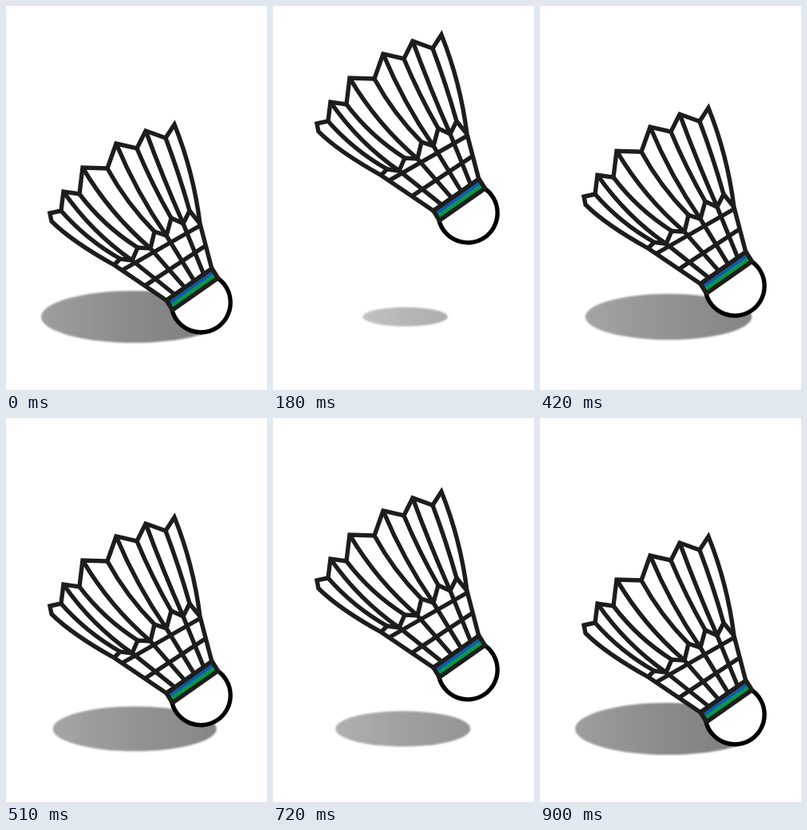
Write an HTML page that moves like this. It is 327 by 480 pixels and loops after 0.93 s.

```html
<!DOCTYPE html>
<html lang="en">
<head>
<meta charset="utf-8">
<title>Bouncing shuttlecock</title>
<style>
  html, body { margin: 0; width: 100%; height: 100%; overflow: hidden; background: #fff; }
  svg { display: block; width: 327px; height: 480px; }
  .ink { fill: none; stroke: #1d1d1b; stroke-width: 5.4; stroke-miterlimit: 8; }
  .paper { fill: #fff; }
</style>
</head>
<body>
<svg viewBox="0 0 327 480">
  <defs>
    <linearGradient id="shade">
      <stop offset="0" stop-color="#9e9e9e"/>
      <stop offset=".45" stop-color="#8c8c8c"/>
      <stop offset="1" stop-color="#7c7c7c"/>
    </linearGradient>
    <filter id="soft" x="-10%" y="-20%" width="120%" height="140%">
      <feGaussianBlur stdDeviation="0.9"/>
    </filter>
  </defs>
  <ellipse id="shadow" fill="url(#shade)" filter="url(#soft)"/>
  <g id="bird">
    <path class="ink paper" style="stroke:#000" d="M208 380A37.2 37.2 0 1 0 265 340Z"/>
    <path class="ink paper" d="M55 259L69 256L72 232L92 235L96 202L127 203L138 172L164 178L175 156L200 165L211 148Q235 208 243 272L258 329L201 368L136 324Q82 294 57 269Z"/>
    <path id="vanes" class="ink"/>
    <path class="ink" d="M136 323L143 316L158 318L165 302L181 303L186 282L201 287L207 265L222 272L230 256L243 272"/>
    <path class="ink" d="M146 330L244 274M175 349L251 299"/>
    <path class="ink" d="M158 318L212 361M181 303L224 352M201 287L236 344M222 272L248 336"/>
    <path fill="#0f5ba6" d="M201 368L258 328L262 334L205 374Z"/>
    <path fill="#0a9648" d="M204.500 374L261.500 334L265 340L208 380Z"/>
    <path class="ink" stroke-linejoin="round" d="M201 368L258 328L265.500 340L208.500 380Z"/>
  </g>
</svg>
<script>
  const $ = id => document.getElementById(id);
  const bird = $('bird'), shadow = $('shadow');

  // Feather folds: x, y at the rim, x, y at the collar, sideways bow
  const folds = [
    [69, 256, 143, 316, 8], [72, 232, 158, 318, 11], [92, 235, 165, 302, 9],
    [96, 202, 181, 303, 11], [127, 203, 186, 282, 7], [138, 172, 201, 287, 7],
    [164, 178, 207, 265, 3], [175, 156, 222, 272, 2], [200, 165, 230, 256, -2]
  ];
  $('vanes').setAttribute('d', folds.map(([x, y, u, v, bow]) => {
    const len = Math.hypot(u - x, v - y);
    const cx = (x + u) / 2 - bow * (v - y) / len;
    const cy = (y + v) / 2 + bow * (u - x) / len;
    return `M${x} ${y}Q${cx} ${cy} ${u} ${v}`;
  }).join(''));

  const STEP = 30, LOOP = 930;
  // Flight legs: start, end (in steps), peak height, ease strength, rising
  const legs = [
    [0, 7, 122, 0.5, true], [7, 14.75, 122, 0.84, false],
    [14.75, 22, 60, 0.42, true], [22, 30, 60, 0.98, false]
  ];

  function height(n) {
    const [from, to, peak, ease, up] = legs.find(leg => n <= leg[1]);
    const p = (n - from) / (to - from);
    const u = up ? 1 - p : p;
    return peak * (1 - u * (1 - ease) - ease * u * u);
  }

  function draw(now) {
    const h = height(Math.floor((now % LOOP) / STEP));
    bird.setAttribute('transform', `translate(0 ${-h})`);
    const set = (name, value) => shadow.setAttribute(name, value);
    set('cx', 160 + 0.05 * h);
    set('cy', 388.5);
    set('rx', 116 - 0.56 * h);
    set('ry', 32.5 - 0.184 * h);
    set('opacity', 1 - 0.0034 * h);
  }

  const start = performance.now();
  (function tick() {
    draw(performance.now() - start);
    requestAnimationFrame(tick);
  })();
</script>
</body>
</html>
```
